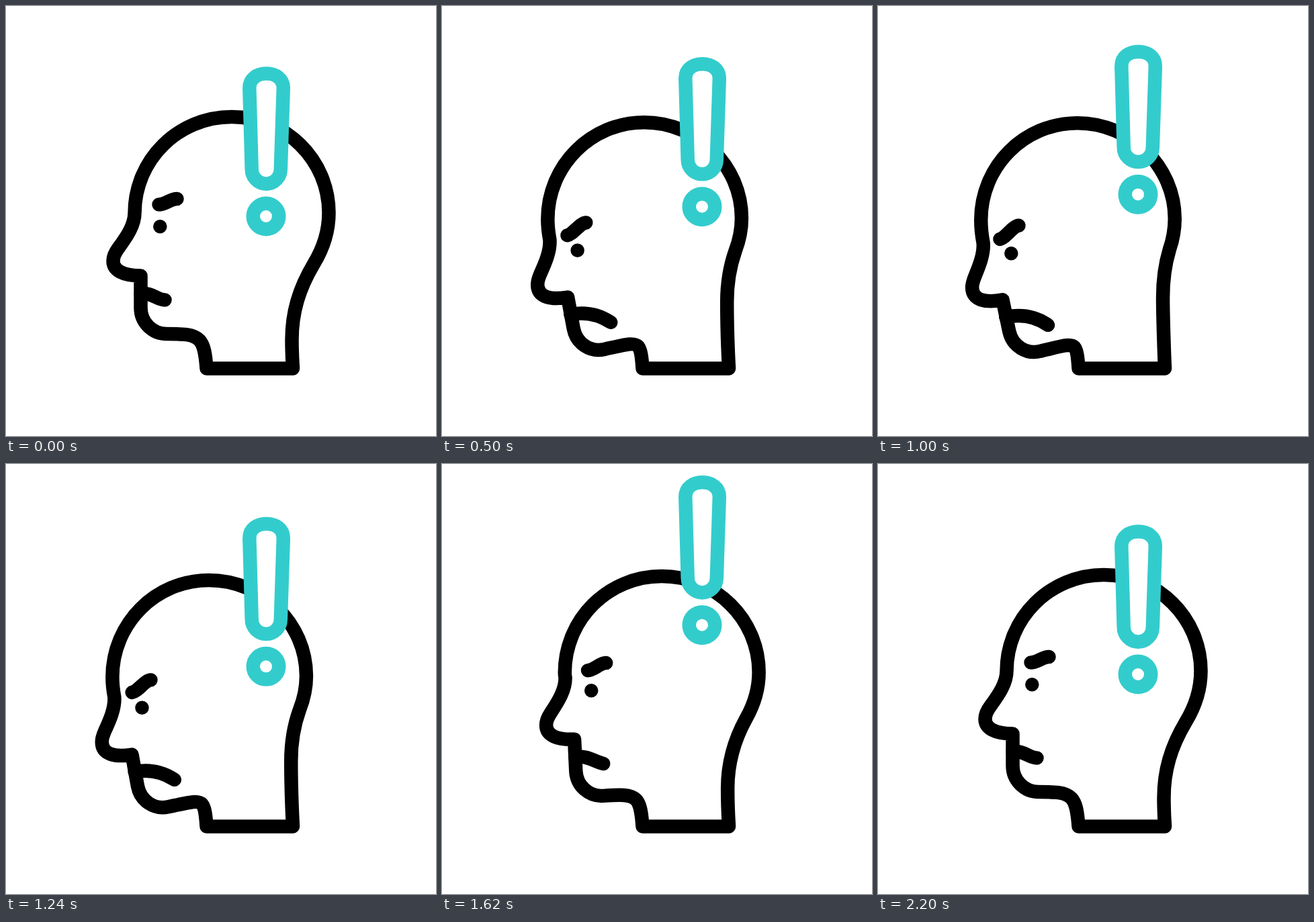
An HTML page for the animation above (2400 ms loop, 640 by 640 pixels).

```html
<!DOCTYPE html>
<html lang="en">
<head>
<meta charset="utf-8">
<title>Alert head</title>
<style>
  html, body { margin: 0; height: 100%; overflow: hidden; background: #fff; }
  svg { display: block; width: 100%; height: 100%; }
</style>
</head>
<body>
<svg viewBox="0 0 640 640" fill="none" stroke="#000" stroke-width="20.5" stroke-linecap="round" stroke-linejoin="round">
  <path id="head"/>
  <path id="mouth"/>
  <path id="brow"/>
  <path id="eye"/>
  <g id="bang" stroke="#33cccc" fill="#fff">
    <path d="M362.3 122C362.3 108 374 100.6 387.5 100.6S412.8 108 412.8 122L408.8 243A21.55 21.7 0 0 1 365.7 243Z"/>
    <circle cx="387" cy="313" r="19.25"/>
  </g>
</svg>
<script>
const LOOP = 2400;
const $ = id => document.getElementById(id);

// Each shape: upright pose, bowed pose
const shapes = {
  head: [
    `M427 539.5 L298.5 539.5 C297 519 295 505 288 497.5 C279 488 262 488 239 488
     C218 488 200.5 471 200.5 449 L200.5 401.5 C175 401.5 159.5 394 159.5 379.5
     C159.5 372.5 163 366 167.5 360 C180 343 191.5 326 191.5 308
     C191.5 308 191.5 308.5 191.5 308.5 C191.5 229 256 165 336 165
     C416 165 480.5 229 480.5 308 C480.5 337 472 361 458 384
     C436 421 425.5 456 425.5 497 C425.5 511 426 525 427 539.5 Z`,
    `M427 539.5 L298.5 539.5 C297.5 524 296 512 292.5 508 C287 502 273 507 242 514.5
     C222 520 200 508 195 485 L185 438.5 C160 443.5 139.5 440 139.5 420
     C139.5 415.5 141 410.5 143 405 C149 390 157 371 155.5 354
     C154 346 152 333 152 319 C152 239 216 174.5 295.5 174.5
     C375 174.5 440.5 239 440.5 317 C440.5 333 438 347 433 362
     C427 383 424 405 424 432 C424 458 426 520 427 539.5 Z`
  ],
  mouth: ['M200.5 428 C217 426 225 437.5 236.5 437.5', 'M190 464 C212 459.5 234 462 253.5 476'],
  brow: ['M227.5 295.5 C237 295.5 245 287 254.5 287', 'M180 348.5 C188 347 199 329 208 328'],
  eye: ['M229.3 328.2 h0', 'M197.3 369.4 h0']
};

const NUM = /[\d.]+/g;
function mix([a, b], p) {
  const to = b.match(NUM);
  let i = 0;
  return a.replace(NUM, n => (+n + (to[i++] - n) * p).toFixed(2));
}

const smooth = s => s * s * (3 - 2 * s);

// cubic-bezier(2/3, 0, 1/3, 1)
function steep(x) {
  let lo = 0, hi = 1;
  for (let i = 0; i < 24; i++) {
    const s = (lo + hi) / 2, r = 1 - s;
    if (2 * r * r * s + r * s * s + s * s * s < x) lo = s; else hi = s;
  }
  return smooth(lo);
}

// Eased value between [time, value] keys
function track(keys, ease, t) {
  const i = keys.findIndex(k => k[0] > t);
  if (i < 0) return keys[keys.length - 1][1];
  if (i === 0) return keys[0][1];
  const [t0, v0] = keys[i - 1], [t1, v1] = keys[i];
  return v0 + (v1 - v0) * ease((t - t0) / (t1 - t0));
}

const bow = [[0, 0], [744, 1], [2175, 0]];
const hop = [[402, 0], [786, -87], [1154, 0], [1533, -87], [1883, 0]];

function draw(now) {
  const t = now % LOOP;
  const p = track(bow, steep, t);
  for (const id in shapes) $(id).setAttribute('d', mix(shapes[id], p));
  $('bang').setAttribute('transform', `translate(0 ${track(hop, smooth, t).toFixed(2)})`);
}

const start = performance.now();
function tick() {
  draw(performance.now() - start);
  requestAnimationFrame(tick);
}
tick();
</script>
</body>
</html>
```
